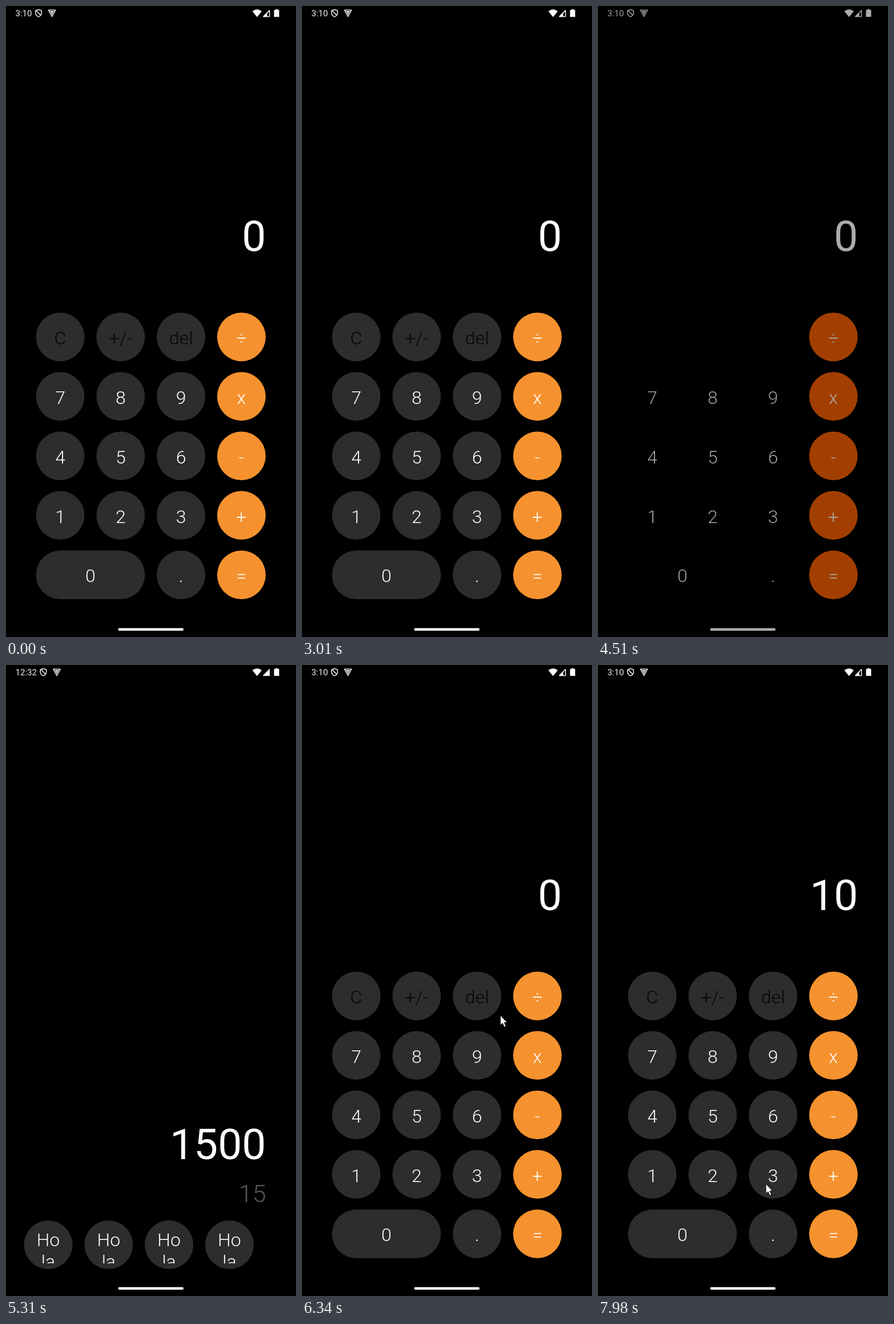
Write an HTML page that moves like this. It is 508 by 1102 pixels and loops after 8000 ms.

```html
<!DOCTYPE html>
<html lang="en">
<head>
<meta charset="utf-8">
<title>Calculator</title>
<style>
  html, body { margin: 0; width: 100%; height: 100%; overflow: hidden; background: #000; }
  svg { display: block; width: 508px; height: 1102px; }
  text { font-family: Roboto, "Noto Sans", sans-serif; fill: #fff; }
  .key { fill: #2d2d2d; }
  .op { fill: #f5922f; }
  .label { font-size: 32px; font-weight: 300; text-anchor: middle; }
  .dark { fill: #050505; }
  .value { font-size: 75px; text-anchor: end; }
  .hint { font-size: 43px; font-weight: 300; text-anchor: end; fill: #585858; }
  .clock { font-size: 15px; fill: #f0f0f0; }
  .line { fill: none; stroke: #f0f0f0; stroke-width: 1.5; stroke-linejoin: round; }
  .solid { fill: #fff; }
  .ripple { fill: #000; opacity: 0; }
</style>
</head>
<body>
<svg viewBox="0 0 508 1102">
  <defs>
    <filter id="dim" filterUnits="userSpaceOnUse" x="0" y="0" width="508" height="1102"
            color-interpolation-filters="sRGB">
      <feComponentTransfer>
        <feFuncR type="linear" slope="1" intercept="0"/>
        <feFuncG type="linear" slope="1" intercept="0"/>
        <feFuncB type="linear" slope="1" intercept="0"/>
      </feComponentTransfer>
    </filter>
    <clipPath id="labelClip"><rect y="970" width="508" height="75"/></clipPath>
    <g id="badges">
      <path class="line" d="M57 6.2L62.3 8.2V12.2Q62 16.6 57 18.9Q52 16.6 51.7 12.2V8.2ZM52.5 7.8L61 16.4"/>
      <path class="line" d="M74.3 7.2H86.7L80.5 18.4Z"/>
      <path class="solid" d="M77 9H84L82.7 11.5H78.3ZM78.7 12.3H82.3L80.5 15.4Z"/>
    </g>
    <g id="power">
      <path class="solid" d="M431.6 9.2Q439.8 2.8 448 9.2L439.8 19.3Z"/>
      <path class="solid" d="M472 5.5H476V7H478.5V19H469.5V7H472Z"/>
    </g>
  </defs>
  <rect width="508" height="1102"/>
  <g id="screen">
    <g id="calc">
      <text class="clock" x="16.5" y="18">3:10</text>
      <use href="#badges"/>
      <use href="#power"/>
      <path class="line" d="M451 18.4H461.6V7.6Z"/>
      <path class="solid" d="M450 19L457.5 11.5V19Z"/>
      <text class="value" id="value" x="455.5" y="428">0</text>
      <g id="keys"></g>
    </g>
    <g id="stale" opacity="0">
      <rect width="508" height="1102"/>
      <text class="clock" x="16.5" y="18">12:32</text>
      <use href="#badges" x="8.5"/>
      <use href="#power"/>
      <path class="solid" d="M449.5 19H462V6.3Z"/>
      <text class="value" x="455.5" y="863">1500</text>
      <text class="hint" x="455.5" y="938">15</text>
      <g id="chips"></g>
    </g>
    <rect class="solid" x="196.5" y="1086.5" width="114.5" height="4.6" rx="2.3"/>
  </g>
  <path id="cursor" fill="#fff" stroke="#000" stroke-width="1"
        d="M0 0V17.5L4 13.8L6.8 20.6L9.9 19.3L7 12.7H12Z"/>
</svg>
<script>
const LOOP = 8000, R = 42.5;
const $ = id => document.getElementById(id);
const clamp = v => Math.min(1, Math.max(0, v));

function add(parent, tag, attrs, content = '') {
  const el = document.createElementNS('http://www.w3.org/2000/svg', tag);
  for (const name in attrs) el.setAttribute(name, attrs[name]);
  el.textContent = content;
  return parent.appendChild(el);
}

// A pill with its centre at (x, y); a zero extra width gives a circle.
function pill(parent, cls, x, y, extra = 0) {
  const w = 2 * R + extra;
  return add(parent, 'rect', { class: cls, x: x - w / 2, y: y - R, width: w, height: 2 * R, rx: R });
}

const ripples = {};
const rows = [['C', '+/-', 'del', '÷'], ['7', '8', '9', 'x'], ['4', '5', '6', '-'],
              ['1', '2', '3', '+'], ['0', '', '.', '=']];
rows.forEach((row, r) => row.forEach((label, c) => {
  if (!label) return;
  const extra = label === '0' ? 105.8 : 0;
  const x = 95 + 105.8 * c + extra / 2, y = 578 + 103.85 * r;
  pill($('keys'), c === 3 ? 'op' : 'key', x, y, extra);
  if (label === '0' || label === '1') ripples[label] = pill($('keys'), 'ripple', x, y, extra);
  const dark = r === 0 && c < 3 ? ' dark' : '';
  add($('keys'), 'text', { class: 'label' + dark, x, y: y + 13 }, label);
}));

for (let c = 0; c < 4; c++) {
  const x = 74 + 105.8 * c;
  pill($('chips'), 'key', x, 1012.5);
  add($('chips'), 'text', { class: 'label', x, y: 1015 }, 'Ho');
  add($('chips'), 'text', { class: 'label', x, y: 1052.5, 'clip-path': 'url(#labelClip)' }, 'la');
}

// Pointer visits: [time, x, y]
const trips = [
  [[1940, 500, 210], [2040, 462, 150], [2140, 470, 90], [2240, 509, 51]],
  [[6100, 503, 520], [6140, 494, 524], [6340, 348, 611], [6560, 215, 765], [6760, 140, 872],
   [6940, 121, 896], [7160, 121, 896], [7400, 140, 965], [7600, 150, 1000],
   [7840, 150, 1000], [7980, 294, 906], [8000, 294, 906]]
];

function pointerAt(t) {
  const path = trips.find(p => t >= p[0][0] && t < p[p.length - 1][0]);
  if (!path) return null;
  const i = path.findIndex(p => p[0] > t);
  const [t0, x0, y0] = path[i - 1], [t1, x1, y1] = path[i];
  const k = (t - t0) / (t1 - t0);
  return [x0 + (x1 - x0) * k, y0 + (y1 - y0) * k];
}

const press = (t, start, length) => 0.16 * Math.sin(Math.PI * clamp((t - start) / length));
const channels = document.querySelectorAll('#dim feComponentTransfer > *');

function render(t) {
  // Screen off: every channel loses the same amount until all is black.
  const off = t < 5310 ? clamp((t - 4380) / 230) ** 2 : 0;
  channels.forEach(ch => ch.setAttribute('intercept', -off));
  if (off) $('screen').setAttribute('filter', 'url(#dim)');
  else $('screen').removeAttribute('filter');

  // Waking shows the old screen first, then reveals the live one.
  $('stale').setAttribute('opacity', t < 5310 ? 0 : 1 - clamp((t - 5370) / 250));

  $('value').textContent = t < 7080 ? '0' : t < 7820 ? '1' : '10';
  ripples['1'].style.opacity = press(t, 7010, 300);
  ripples['0'].style.opacity = press(t, 7780, 190);

  const at = pointerAt(t);
  $('cursor').style.display = at ? '' : 'none';
  if (at) $('cursor').setAttribute('transform', `translate(${at[0]} ${at[1]})`);
}

const start = performance.now();
function tick() {
  render((performance.now() - start) % LOOP);
  requestAnimationFrame(tick);
}
render(0);
requestAnimationFrame(tick);
</script>
</body>
</html>
```
